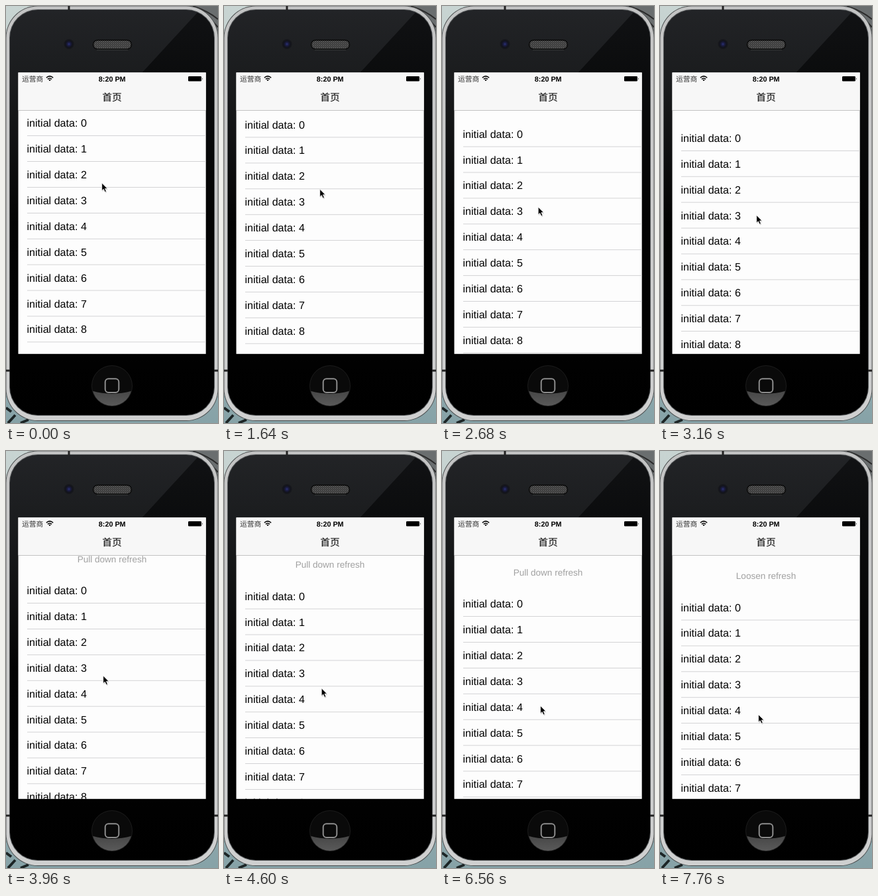
These frames come from a looping animation (320x629 px, 8000 ms). An HTML page:

```html
<!DOCTYPE html>
<html lang="zh">
<head>
<meta charset="utf-8">
<title>Pull to refresh</title>
<style>
  html, body { margin: 0; width: 100%; height: 100%; overflow: hidden; background: #a9bcbe; }
  svg { display: block; width: 320px; height: 629px; }
  text { font-family: "Liberation Sans", Arial, sans-serif; text-rendering: geometricPrecision; }
  .cjk { font-family: "Noto Sans CJK SC", "Noto Sans CJK", sans-serif; }
</style>
</head>
<body>
<svg viewBox="0 0 320 629" xmlns="http://www.w3.org/2000/svg">
  <defs>
    <linearGradient id="desk" x2="0" y2="1">
      <stop offset="0" stop-color="#c8d4d2"/><stop offset=".5" stop-color="#b4c3c4"/><stop offset="1" stop-color="#86a2a7"/>
    </linearGradient>
    <linearGradient id="rim" x2="0" y2="1">
      <stop offset="0" stop-color="#c2c3c3"/><stop offset=".15" stop-color="#c8c8c8"/><stop offset="1" stop-color="#cfd0d0"/>
    </linearGradient>
    <linearGradient id="face" x2="0" y2="1">
      <stop offset="0" stop-color="#111214"/><stop offset=".16" stop-color="#0b0c0d"/><stop offset=".5" stop-color="#040404"/><stop offset="1" stop-color="#000"/>
    </linearGradient>
    <linearGradient id="gloss" x2="0" y2="1">
      <stop offset="0" stop-color="#e8f0ff" stop-opacity=".08"/><stop offset=".35" stop-color="#e8f0ff" stop-opacity=".07"/><stop offset="1" stop-color="#e8f0ff" stop-opacity="0"/>
    </linearGradient>
    <linearGradient id="crescent" x2="0" y2="1">
      <stop offset="0" stop-color="#464646"/><stop offset="1" stop-color="#5c5c5c"/>
    </linearGradient>
    <radialGradient id="lens">
      <stop offset="0" stop-color="#2b3178"/><stop offset=".45" stop-color="#1a1c40"/><stop offset="1" stop-color="#101118"/>
    </radialGradient>
    <pattern id="mesh" width="3" height="3" patternUnits="userSpaceOnUse">
      <rect width="3" height="3" fill="#2c2c2c"/>
      <path d="M0 0L3 3M3 0L0 3" stroke="#6c6c6c" stroke-width=".7"/>
    </pattern>
    <clipPath id="body"><rect x="6" y="6" width="308" height="611" rx="42"/></clipPath>
    <clipPath id="button"><circle cx="160" cy="573" r="30"/></clipPath>
    <clipPath id="view"><rect x="18.5" y="157" width="283.2" height="367.8"/></clipPath>
  </defs>

  <rect width="320" height="629" fill="url(#desk)"/>
  <path d="M252 0H320V44Q300 8 252 0Z" fill="#6a6e6f"/>
  <path d="M268 0Q300 8 320 32M282 0Q306 8 320 20" fill="none" stroke="#2a2a2a" stroke-width="2"/>
  <path d="M0 606L8 612M3 629L14 617M22 629L34 624" stroke="#1c2526" stroke-width="4"/>

  <rect x="-.5" y="-.5" width="321" height="626.5" rx="48.5" fill="#4a4d4e"/>
  <rect x=".5" y=".5" width="319" height="624.5" rx="47.5" fill="url(#rim)"/>
  <rect x="5" y="5" width="310" height="613" rx="43" fill="#55585a"/>
  <rect x="6" y="6" width="308" height="611" rx="42" fill="url(#face)"/>
  <path d="M95 0V6M0 550H6M314 550H320" stroke="#222" stroke-width="3"/>
  <path d="M0 0H298L205 101H18V330H0Z" fill="url(#gloss)" clip-path="url(#body)"/>

  <circle cx="95" cy="57.5" r="7.5" fill="#16171c"/>
  <circle cx="95" cy="57.5" r="5.5" fill="url(#lens)"/>
  <rect x="131.5" y="51.5" width="58" height="13.5" rx="6.7" fill="url(#mesh)" stroke="#0a0a0a" stroke-width="1.6"/>
  <path d="M137 66.3H184" stroke="#3e3f40" stroke-width=".8"/>

  <circle cx="160" cy="573" r="30.5" fill="#0a0a0a" stroke="#1c1c1c"/>
  <path d="M128 580Q160 590 192 580V606H128Z" fill="url(#crescent)" clip-path="url(#button)"/>
  <rect x="149.7" y="562.3" width="20.6" height="20.6" rx="5" fill="none" stroke="#8d8d8d" stroke-width="2"/>

  <rect x="18.5" y="100.4" width="283.2" height="424.4" fill="#fdfdfd"/>
  <g clip-path="url(#view)">
    <text id="hint" x="160" text-anchor="middle" font-size="13.55" fill="#a0a0a0"></text>
    <g id="list"></g>
  </g>
  <rect x="18.5" y="100.4" width="283.2" height="56.6" fill="#f7f7f7"/>
  <rect x="18.5" y="157" width="283.2" height=".8" fill="#b5b5b5"/>
  <text class="cjk" x="24" y="113.7" font-size="10.8" fill="#333">运营商</text>
  <g fill="none" stroke="#000" stroke-width="1.5">
    <path d="M60.8 108.2Q66 103.5 71.2 108.2M62.9 110.4Q66 107.7 69.1 110.4"/>
    <path d="M64.3 111.4Q66 109.9 67.7 111.4L66 113.3Z" fill="#000" stroke="none"/>
  </g>
  <text x="160.2" y="113.6" font-size="10.8" font-weight="700" text-anchor="middle">8:20 PM</text>
  <rect x="275" y="106" width="20" height="7.6" rx="1.4"/>
  <path d="M296 108.2Q297.6 109.8 296 111.4Z"/>
  <text class="cjk" x="160" y="143" font-size="14.8" font-weight="500" text-anchor="middle">首页</text>

  <g id="cursor">
    <path d="M1 2V13L3.5 10.8L5.4 15L7.4 14L5.6 10H9Z" fill="#000" opacity=".18"/>
    <path d="M0 0V11.6L2.6 9.2L4.6 13.6L6.7 12.7L4.8 8.4H8.4Z" fill="#000" stroke="#fff" stroke-width=".8"/>
  </g>
</svg>
<script>
const LOOP = 8000, STEP = 40;
const ROWS = 9, PITCH = 38.9;
const GRAB_Y = 272, VIEW_HEIGHT = 424, TRIGGER = 57.5;

// Pointer position over time: [ms, x, y]
const pointerPath = [
  [1280, 144.7, 267], [2240, 144.7, 291.8], [3160, 145.7, 315.6], [3960, 146.7, 339],
  [4640, 147.2, 359], [5400, 147.7, 372.6], [5520, 147.7, 372.8], [6360, 148.5, 380.3],
  [6560, 148.5, 384.3], [7240, 148.5, 391.9], [7760, 148.5, 397.5]
];

const byId = id => document.getElementById(id);
const list = byId('list'), hint = byId('hint'), cursor = byId('cursor');

function add(parent, tag, attrs, content = '') {
  const node = document.createElementNS('http://www.w3.org/2000/svg', tag);
  for (const key in attrs) node.setAttribute(key, attrs[key]);
  node.textContent = content;
  parent.appendChild(node);
}

for (let i = 0; i < ROWS; i++) {
  const top = 156.8 + i * PITCH;
  add(list, 'text', { x: 31.5, y: top + 25.4, 'font-size': 16.1 }, `initial data: ${i}`);
  add(list, 'rect', { x: 32, y: top + 38.4, width: 270, height: 0.9, fill: '#cfcfd1' });
}

function pointerAt(t) {
  const next = pointerPath.findIndex(p => p[0] > t);
  if (next === 0) return pointerPath[0].slice(1);
  if (next < 0) return pointerPath[pointerPath.length - 1].slice(1);
  const a = pointerPath[next - 1], b = pointerPath[next];
  const k = (t - a[0]) / (b[0] - a[0]);
  return [1, 2].map(i => a[i] + (b[i] - a[i]) * k);
}

// Overscroll resistance of the list
function rubberBand(pull) {
  return pull <= 0 ? 0 : VIEW_HEIGHT * (1 - 1 / (1 + 0.55 * pull / VIEW_HEIGHT));
}

function render(t) {
  const [x, y] = pointerAt(t);
  const offset = rubberBand(y - GRAB_Y);
  cursor.setAttribute('transform', `translate(${x} ${y})`);
  list.setAttribute('transform', `translate(0 ${offset})`);
  hint.setAttribute('y', 133.8 + offset);
  hint.textContent = offset < TRIGGER ? 'Pull down refresh' : 'Loosen refresh';
}

const start = performance.now();
function tick() {
  const t = (performance.now() - start) % LOOP;
  render(Math.floor(t / STEP) * STEP);
  requestAnimationFrame(tick);
}
tick();
</script>
</body>
</html>
```
